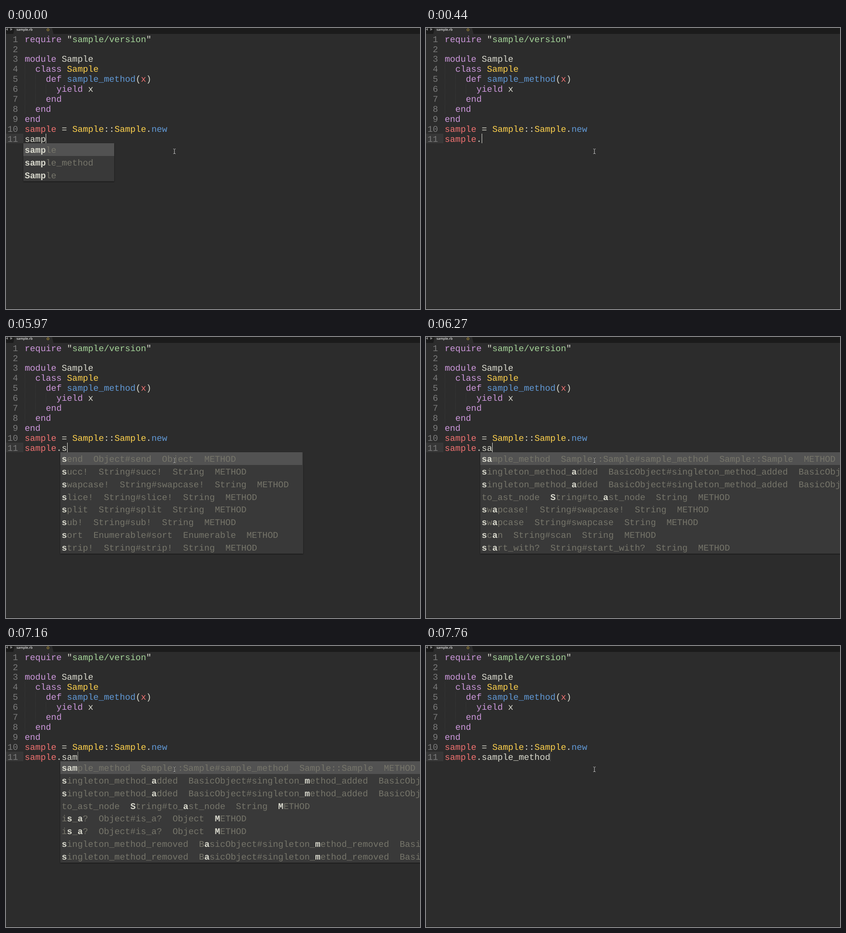
An HTML page that plays this animation: 907x617 px, repeating every 8 s.

```html
<!DOCTYPE html>
<html lang="en">
<head>
<meta charset="utf-8">
<title>Editor autocompletion</title>
<style>
  html, body { margin: 0; width: 100%; height: 100%; overflow: hidden; background: #2c2c2c; }
  svg { display: block; }
  text {
    font: 19.28px "Liberation Mono", "DejaVu Sans Mono", monospace;
    text-rendering: geometricPrecision;
    white-space: pre;
  }
  .bold { font-weight: 700; }
  .tab { font: 600 7.3px "Open Sans", "Noto Sans", sans-serif; }
  .popup { filter: drop-shadow(0 1px 1px #0009); }
</style>
</head>
<body>
<svg width="907" height="617" viewBox="0 0 907 617">
  <rect width="907" height="13" fill="#1b1b1b"/>
  <path d="M16 13 19 0H101L104 13Z" fill="#2c2c2c"/>
  <path d="M0 3 4 0V6ZM9.500 0 14.500 3 9.500 6Z" fill="#858585"/>
  <text class="tab" x="23" y="6.200" fill="#e4e4e4">sample.rb</text>
  <circle cx="92" cy="4" r="2.300" fill="none" stroke="#c9a53c"/>
  <rect y="616" width="907" height="1" fill="#1e1e1e"/>
  <rect y="232" width="38" height="21" fill="#373737"/>
  <path d="M41.500 79V188M64.500 101V166M87.500 123V145" stroke="#3b3b3b" stroke-dasharray="1 1"/>
  <g id="code"></g>
  <g id="live"></g>
  <g fill="none">
    <path d="M366.500 265.500H368L369 266.500 370 265.500H371.500M369 266.500V275M366.500 276H368L369 275 370 276H371.500M367.500 272.500H370.500" stroke="#222" stroke-width="2.600"/>
    <path d="M366.500 265.500H368L369 266.500 370 265.500H371.500M369 266.500V275M366.500 276H368L369 275 370 276H371.500" stroke="#ddd"/>
  </g>
</svg>
<script>
const CHAR = 11.57, LINE = 21.9, ROW = 27.85, LEFT = 41, LOOP = 8000;
const COLOR = {
  p: '#cd98dc', w: '#dadace', g: '#a4d398', y: '#fdd04d',
  b: '#6199d6', r: '#ef7170', n: '#7b7b7b', dim: '#76756a'
};
const baseline = line => 30.6 + (line - 1) * LINE;

// One text element per word keeps every column on the character grid.
function type(x, y, str, color, bold) {
  return [...str.matchAll(/\S+/g)].map(m =>
    `<text x="${(x + m.index * CHAR).toFixed(2)}" y="${y.toFixed(2)}" fill="${COLOR[color]}"${bold ? ' class="bold"' : ''}>${m[0]}</text>`
  ).join('');
}

// Tokens are strings whose first letter names the colour.
function codeLine(line, tokens) {
  let col = 0, out = '';
  for (const token of tokens) {
    const str = token.slice(1);
    out += type(LEFT + col * CHAR, baseline(line), str, token[0]);
    col += str.length;
  }
  return out;
}

const program = [
  ['prequire', 'w "', 'gsample/version', 'w"'],
  [],
  ['pmodule', 'w Sample'],
  ['p  class', 'y Sample'],
  ['p    def', 'b sample_method', 'w(', 'rx', 'w)'],
  ['p      yield', 'w x'],
  ['p    end'],
  ['p  end'],
  ['pend'],
  ['rsample', 'w = ', 'ySample', 'w::', 'ySample', 'w.', 'bnew'],
  []
];
document.getElementById('code').innerHTML = program.map((tokens, i) => {
  const num = String(i + 1);
  return type(26.3 - num.length * CHAR, baseline(i + 1), num, 'n') + codeLine(i + 1, tokens);
}).join('');

const method = (name, owner) => `${name}  ${owner}#${name}  ${owner}  METHOD`;
const from = (owner, ...names) => names.map(name => method(name, owner));

const words = ['sample', 'sample_method', 'Sample'];
const all = [
  ...from('Object', 'methods', 'taint', '===', 'send', 'instance_variable_get', '__setobj__', 'to_enum'),
  'singleton_method_undefined  BasicObject#singlet…method_undefined  B…'
];
const startS = [
  method('send', 'Object'),
  ...from('String', 'succ!', 'swapcase!', 'slice!', 'split', 'sub!'),
  method('sort', 'Enumerable'),
  method('strip!', 'String')
];
// A bar marks where matching begins.
const common = [
  method('sample_method', 'Sample::Sample'),
  ...from('BasicObject', 'singleton_method_added', 'singleton_method_added'),
  method('to_ast_node', 'String').replace('String', '|String')
];
const startSa = [...common, ...from('String', 'swapcase!', 'swapcase', 'scan', 'start_with?')];
const startSam = [
  ...common,
  ...from('Object', 'is_a?', 'is_a?'),
  ...from('BasicObject', 'singleton_method_removed', 'singleton_method_removed')
];

function entry(x, y, item, query) {
  const begin = Math.max(0, item.indexOf('|'));
  const str = item.replace('|', '');
  let hit = 0, out = '', run = '', runBold = false, start = 0;
  const flush = end => {
    out += type(x + start * CHAR, y, run, runBold ? 'w' : 'dim', runBold);
    run = '';
    start = end;
  };
  [...str].forEach((ch, i) => {
    const bold = i >= begin && hit < query.length && ch.toLowerCase() === query[hit];
    if (bold) hit++;
    if (bold !== runBold) flush(i);
    runBold = bold;
    run += ch;
  });
  flush(str.length);
  return out;
}

function popup({ x, width, items, query }) {
  const height = items.length * ROW;
  const selected = width === 532 ? width - 2 : width;
  return `<g class="popup"><rect x="${x}" y="253" width="${width}" height="${height}" fill="#393939"/></g>` +
    `<rect x="${x}" y="253" width="${selected}" height="28" fill="#525252"/>` +
    items.map((item, i) => entry(x + 3, 274 + i * ROW, item, query)).join('');
}

const small = query => ({ x: 38, width: 199, items: words, query });
const large = (items, query, width = 800) => ({ x: 119, width, items, query });
const call = rest => ['rsample', 'w.' + rest];

// Start time, typed tokens, caret opacity, popup.
const steps = [
  [0, ['wsamp'], 1, small('samp')],
  [140, ['wsampl'], 1, small('sampl')],
  [290, ['wsample'], 1, small('sample')],
  [440, call(''), 1],
  [5680, call(''), 1, large(all, '')],
  [5970, call('s'), 1, large(startS, 's', 532)],
  [6270, call('sa'), 1, large(startSa, 'sa')],
  [6710, call('sa'), 0.5, large(startSa, 'sa')],
  [6860, call('sam'), 1, large(startSam, 'sam')],
  [7160, call('sam'), 0.6, large(startSam, 'sam')],
  [7310, call('sample_method'), 1],
  [7760, call('sample_method'), 0.25]
];

const live = document.getElementById('live');
let shown, origin;
function draw(now) {
  origin ??= now;
  const t = (now - origin) % LOOP;
  const step = steps.findLast(s => s[0] <= t);
  if (step !== shown) {
    shown = step;
    const [, tokens, caret, list] = step;
    const cols = tokens.reduce((sum, token) => sum + token.length - 1, 0);
    live.innerHTML = codeLine(11, tokens) +
      `<rect x="${Math.round(LEFT + cols * CHAR)}" y="232" width="1" height="21" fill="#e0e0d8" opacity="${caret}"/>` +
      (list ? popup(list) : '');
  }
  requestAnimationFrame(draw);
}
draw(performance.now());
</script>
</body>
</html>
```
